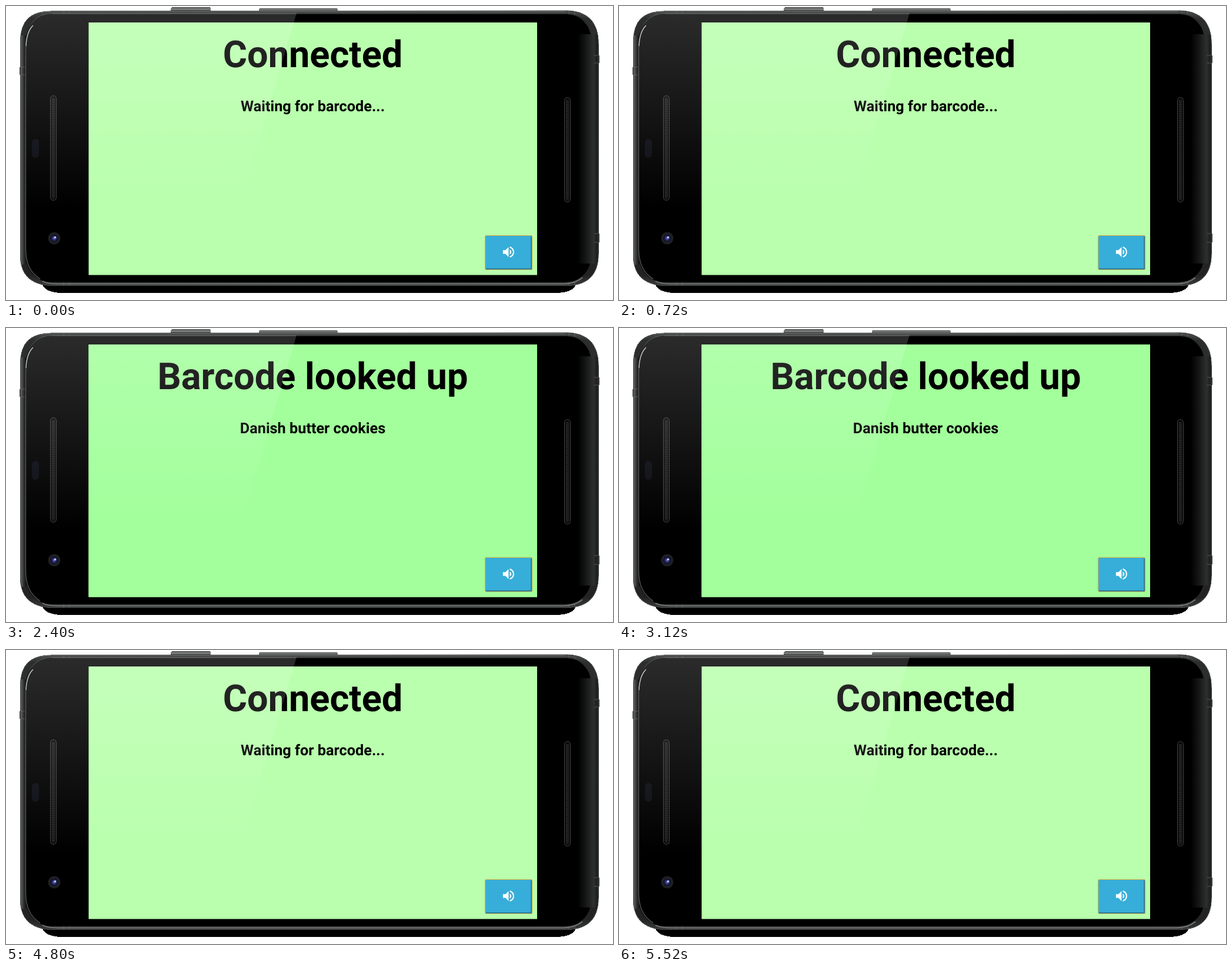
Write an HTML page that moves like this. It is 1032x500 px and loops after 6 s.

```html
<!DOCTYPE html>
<html lang="en">
<head>
<meta charset="utf-8">
<title>Barcode scanner screen</title>
<style>
  html, body { margin: 0; width: 100%; height: 100%; overflow: hidden; background: #fff; }
  svg { display: block; width: 1032px; height: 500px; }
  text { font-family: Roboto, Arial, sans-serif; font-weight: 700; text-anchor: middle; text-rendering: geometricPrecision; }
  .title { font-size: 63.1px; }
  .detail { font-size: 25.25px; }
  .hard { shape-rendering: crispEdges; }
  .state { visibility: hidden; animation: show 6s step-end infinite; }
  .success { animation-delay: 1.2s; }
  .lookup { animation-delay: 2.4s; }
  .unknown { animation-delay: 3.6s; }
  @keyframes show {
    0% { visibility: visible; }
    20%, 100% { visibility: hidden; }
  }
</style>
</head>
<body>
<svg viewBox="0 0 1032 500" xmlns="http://www.w3.org/2000/svg">
  <defs>
    <linearGradient id="rim" x1="0" y1="0" x2="0" y2="1">
      <stop offset="0" stop-color="#4e5050"/>
      <stop offset=".03" stop-color="#2c2d2d"/>
      <stop offset=".5" stop-color="#303131"/>
      <stop offset=".96" stop-color="#222"/>
      <stop offset="1" stop-color="#3a3b3b"/>
    </linearGradient>
    <linearGradient id="side">
      <stop offset="0" stop-color="#6a6c6c"/>
      <stop offset=".6" stop-color="#2b2c2c"/>
      <stop offset="1" stop-color="#111"/>
    </linearGradient>
    <linearGradient id="rightSide">
      <stop offset="0" stop-color="#000"/>
      <stop offset=".4" stop-color="#161717"/>
      <stop offset=".75" stop-color="#2e2f2f"/>
      <stop offset="1" stop-color="#151515"/>
    </linearGradient>
    <linearGradient id="key" x1="0" y1="0" x2="0" y2="1">
      <stop offset="0" stop-color="#343636"/>
      <stop offset=".45" stop-color="#8a8d8c"/>
      <stop offset="1" stop-color="#2a2b2b"/>
    </linearGradient>
    <linearGradient id="shine" gradientUnits="userSpaceOnUse" x1="0" y1="10" x2="0" y2="345">
      <stop offset="0" stop-color="#fff" stop-opacity=".17"/>
      <stop offset="1" stop-color="#fff" stop-opacity="0"/>
    </linearGradient>
    <radialGradient id="lens">
      <stop offset="0" stop-color="#6a74c8"/>
      <stop offset=".35" stop-color="#20245e"/>
      <stop offset=".6" stop-color="#10111c"/>
      <stop offset=".7" stop-color="#222328"/>
      <stop offset="1" stop-color="#1b1c20"/>
    </radialGradient>
    <pattern id="mesh" width="4" height="3" patternUnits="userSpaceOnUse">
      <rect width="4" height="3" fill="#141414"/>
      <path d="M0 .5H4" stroke="#343434"/>
    </pattern>
    <path id="body" d="M24 62C24 24 42 9 76 8.500L955 7.500Q1007.500 10 1007.500 64V422Q1007.500 474 955 476H76Q24 473 24 424Z"/>
    <clipPath id="bodyClip"><use href="#body"/></clipPath>
    <rect id="screen" x="140.5" y="28" width="762.5" height="429.5"/>
    <g id="speaker">
      <rect x=".5" y=".5" width="10" height="178" rx="5" fill="#0a0a0a" stroke="#424242"/>
      <rect x="3" y="4" width="5" height="171" rx="2.5" fill="url(#mesh)"/>
    </g>
  </defs>

  <!-- phone -->
  <g class="hard">
    <path d="M62 474H968Q966 486 938 488H92Q66 486 62 474Z"/>
    <path d="M280 9V4Q281 2 284 2H344Q347 2 348 4V9Z" fill="url(#key)"/>
    <path d="M430 9V6Q430 4 433 4H561Q564 4 564 6V9Z" fill="url(#key)"/>
    <path d="M23 104H25V117H23ZM1006 84H1009V97H1006ZM1006 387H1009V402H1006Z" fill="#444"/>
    <use href="#body" fill="url(#rim)"/>
  </g>
  <g clip-path="url(#bodyClip)">
    <rect x="24" y="50" width="11" height="390" fill="url(#side)"/>
    <rect x="34" y="13" width="961" height="457" rx="44"/>
    <rect x="972" y="48" width="36" height="390" fill="url(#rightSide)"/>
    <path d="M98 8V14M108 8V14M98 469V476M108 469V476M24 104H32M24 117H32M1000 84H1008M1000 97H1008M1000 387H1008M1000 402H1008M967 8V14M957 8V14M967 469V476M957 469V476" stroke="#777" stroke-opacity=".6"/>
    <use href="#body" fill="none" stroke="#484a4a" stroke-width="2"/>
  </g>
  <path d="M78 13.5H952Q997 15 997 62V420Q997 468 952 470H78" fill="none" stroke="#292a2a"/>
  <path d="M45 34Q34 44 33.5 74V414Q34 450 58 464" fill="none" stroke="#5c5e5e" stroke-width="1.2"/>
  <path d="M34 68Q35 44 46 33" fill="none" stroke="#b0b2b2" stroke-width="1.4"/>
  <path d="M62 468Q70 472.5 88 472.5H948Q968 472 980 462" fill="none" stroke="#737575" stroke-width="2"/>
  <path d="M60 11Q68 9.5 80 9.5H950" fill="none" stroke="#696b6b"/>

  <use href="#speaker" x="75" y="152"/>
  <use href="#speaker" x="949" y="155"/>
  <rect x="44" y="226" width="12" height="32" rx="6" fill="#0b0b14"/>
  <circle cx="82" cy="395" r="10.5" fill="url(#lens)"/>
  <circle cx="83.5" cy="393.5" r="1.8" fill="#c5c9f5"/>

  <!-- screen -->
  <g>
    <use href="#screen" fill="#b9ffad"/>
    <text class="title" x="521.5" y="104">Connected</text>
    <text class="detail" x="521.5" y="179">Waiting for barcode...</text>
  </g>
  <g class="state success">
    <use href="#screen" fill="#47ac3f"/>
    <text class="title" x="521.5" y="104">Scan success</text>
    <text class="detail" x="521.5" y="179">Consuming 1 Piece of Yoghurt</text>
  </g>
  <g class="state lookup">
    <use href="#screen" fill="#a2ff9b"/>
    <text class="title" x="521.5" y="104">Barcode looked up</text>
    <text class="detail" x="521.5" y="179">Danish butter cookies</text>
  </g>
  <g class="state unknown">
    <use href="#screen" fill="#e8ff8a"/>
    <text class="title" x="521.5" y="104">Unknown barcode</text>
    <text class="detail" x="521.5" y="179">123456</text>
  </g>

  <!-- sound button -->
  <rect x="814.8" y="390.5" width="79.7" height="57.8" rx="1.5" fill="#36aed9" stroke="#cfa23c"/>
  <path d="M816 447H893V392" fill="none" stroke="#28708c" stroke-width="1.4"/>
  <path transform="translate(841.7 405.7) scale(1.06)" fill="#fff" d="M3 9v6h4l5 5V4L7 9H3zm13.5 3c0-1.77-1.02-3.29-2.5-4.03v8.05c1.48-.73 2.5-2.25 2.5-4.02zM14 3.23v2.06c2.89.86 5 3.54 5 6.71s-2.11 5.85-5 6.71v2.06c4.01-.91 7-4.49 7-8.77s-2.99-7.86-7-8.77z"/>

  <!-- glass reflection -->
  <path d="M34 62Q36 14 78 12H494L396 345H34Z" fill="url(#shine)"/>
</svg>
</body>
</html>
```
